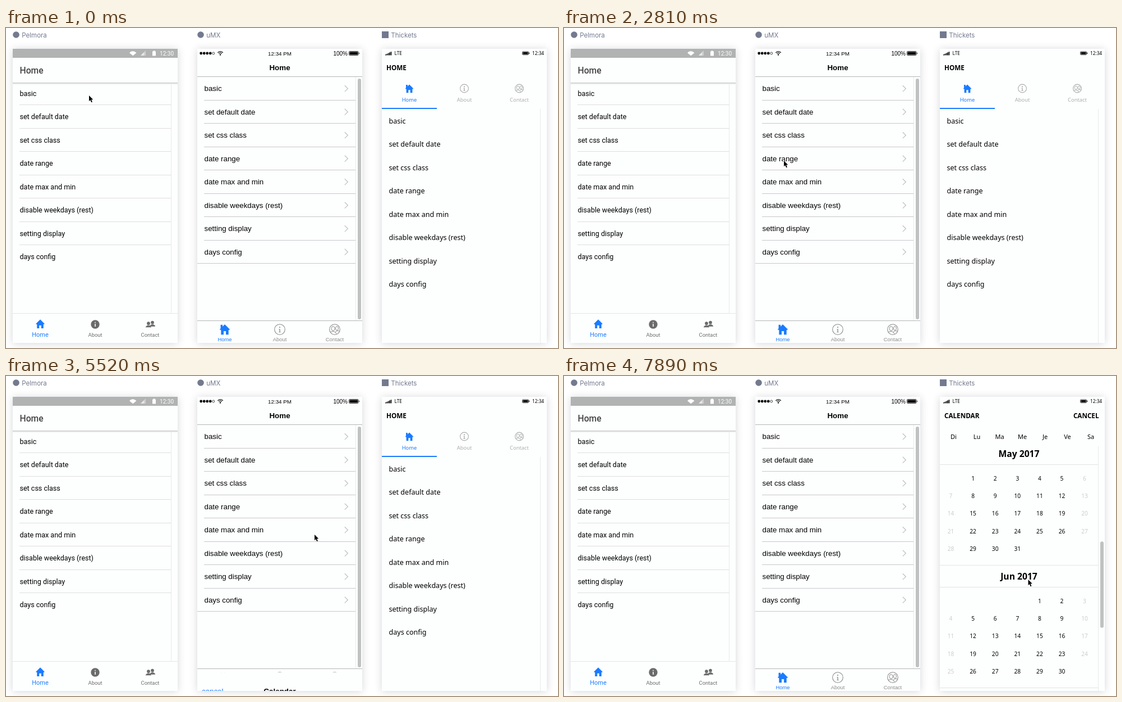
Write an HTML page with a canvas that moves like this. It is 984 by 569 pixels and loops after 8 s.

```html
<!DOCTYPE html>
<html lang="en">
<head>
<meta charset="utf-8">
<title>Calendar demo on three platforms</title>
<style>
html, body { margin: 0; width: 984px; height: 569px; overflow: hidden; background: #fff; }
canvas { display: block; width: 984px; height: 569px; }
</style>
</head>
<body>
<canvas id="stage"></canvas>
<script>
const canvas = document.getElementById('stage');
const ctx = canvas.getContext('2d');
const ratio = window.devicePixelRatio || 1;
canvas.width = 984 * ratio;
canvas.height = 569 * ratio;

const LOOP = 8000, TOP = 37, BOTTOM = 560, WIDTH = 294;
const BLUE = '#1a7bff', PAPER = '#fdfefe', LINE = '#dedede';
const ROBOTO = 'Roboto, sans-serif';
const LIB = '"Liberation Sans", Arial, sans-serif';
const NOTO = '"Noto Sans", sans-serif';

// The picture is refreshed in bursts: [first, last, count]
const BURSTS = [[720, 1630, 7], [1780, 2510, 6], [2810, 3740, 7], [3890, 4930, 8],
  [5070, 5070, 1], [5370, 6400, 8], [6540, 7450, 7], [7600, 7890, 3]];
// Pointer: [time, x, y]
const PATH = [[0, 148, 120], [800, 148, 120], [1175, 215.5, 287], [1480, 224, 292], [1780, 224, 292],
  [2510, 392, 236], [2965, 392, 236], [3740, 556, 281], [3890, 556, 281], [4336, 554.5, 313],
  [4930, 560, 289], [5070, 561, 290], [5370, 561, 290], [5517, 550, 282], [6400, 728, 368],
  [6540, 728, 368], [6995, 718, 373], [7298, 827.5, 362], [8000, 827.5, 362]];
const ITEMS = ['basic', 'set default date', 'set css class', 'date range', 'date max and min',
  'disable weekdays (rest)', 'setting display', 'days config'];
const WEEK = ['Di', 'Lu', 'Ma', 'Me', 'Je', 'Ve', 'Sa'];
const WEEK_X = [36.5, 78, 118.5, 159, 199.5, 239.5, 281];
const MONTHS = ['Mar', 'Apr', 'May', 'Jun', 'Jul'].map((name, i) => ({
  name: name + ' 2017',
  first: new Date(Date.UTC(2017, 2 + i, 1)).getUTCDay(),
  days: new Date(Date.UTC(2017, 3 + i, 0)).getUTCDate()
}));

const clamp = v => Math.max(0, Math.min(1, v));
const easeOut = p => 1 - Math.pow(1 - p, 3);
const progress = (t, from, span) => easeOut(clamp((t - from) / span));

function snap(t) {
  let last = 0;
  for (const [a, b, n] of BURSTS) {
    for (let i = 0; i < n; i++) {
      const s = n > 1 ? a + (b - a) * i / (n - 1) : a;
      if (s <= t + 10) last = s;
    }
  }
  return last;
}

function pointerAt(t) {
  const i = Math.max(1, PATH.findIndex(k => k[0] >= t));
  const [a, x, y] = PATH[i - 1], [b, x2, y2] = PATH[i];
  const p = clamp((t - a) / (b - a)), e = p * p * (3 - 2 * p);
  return [x + (x2 - x) * e, y + (y2 - y) * e];
}

// Text is placed by the middle of its capitals
function text(s, x, y, size, family, color = '#000', align = 'left', weight = 400) {
  ctx.font = `${weight} ${size}px ${family}`;
  ctx.fillStyle = color;
  ctx.textAlign = align;
  ctx.fillText(s, x, y + size * 0.36);
}
function rect(x, y, w, h, color) {
  ctx.fillStyle = color;
  ctx.fillRect(x, y, w, h);
}
function round(x, y, w, h, r, color) {
  ctx.fillStyle = color;
  ctx.beginPath();
  ctx.roundRect(x, y, w, h, r);
  ctx.fill();
}
function poly(points, color) {
  ctx.fillStyle = color;
  ctx.beginPath();
  points.forEach(([x, y]) => ctx.lineTo(x, y));
  ctx.closePath();
  ctx.fill();
}
function stroke(color, width, build) {
  ctx.strokeStyle = color;
  ctx.lineWidth = width;
  ctx.beginPath();
  build();
  ctx.stroke();
}
function disc(x, y, r, color) {
  ctx.fillStyle = color;
  ctx.beginPath();
  ctx.arc(x, y, r, 0, 7);
  ctx.fill();
}
function ring(x, y, r, color, width = 1) {
  stroke(color, width, () => ctx.arc(x, y, r, 0, 7));
}
const hline = (x, y, w, color = LINE) => rect(x, Math.floor(y), w, 1, color);
const vline = (x, y, y2) => rect(x, y, 1, y2 - y, '#e9eaea');

function house(x, y, r, chimney) {
  const at = pts => pts.map(([u, v]) => [x + u * r, y + v * r]);
  poly(at([[0, -1], [1, 0], [0.72, 0.08], [0.72, 0.95], [0.22, 0.95], [0.22, 0.3],
    [-0.22, 0.3], [-0.22, 0.95], [-0.72, 0.95], [-0.72, 0.08], [-1, 0]]), BLUE);
  if (chimney) poly(at([[-0.8, -0.92], [-0.42, -0.92], [-0.42, -0.4], [-0.8, 0]]), BLUE);
}
function info(x, y, r, color) {
  ring(x, y, r, color, 1.1);
  disc(x, y - r * 0.42, 1.1, color);
  rect(x - 0.7, y - r * 0.1, 1.4, r * 0.62, color);
  rect(x - 1.6, y - r * 0.1, 1.6, 0.8, color);
  rect(x - 1.8, y + r * 0.48, 3.6, 0.8, color);
}
function person(x, y, k, color) {
  disc(x, y - 3 * k, 3 * k, color);
  ctx.beginPath();
  ctx.ellipse(x, y + 4.4 * k, 5.4 * k, 3.8 * k, 0, Math.PI, 0);
  ctx.fill();
}
function pair(x, y, r, color) {
  ring(x, y, r, color, 1.1);
  ctx.save();
  ctx.beginPath();
  ctx.arc(x, y, r, 0, 7);
  ctx.clip();
  const k = r / 9.5;
  stroke(color, 1, () => ctx.ellipse(x - 3 * k, y - 1.6 * k, 3 * k, 4 * k, 0, 0, 7));
  stroke(color, 1, () => ctx.ellipse(x + 4 * k, y - 2 * k, 2.6 * k, 3.6 * k, 0, 0, 7));
  stroke(color, 1, () => ctx.ellipse(x - 3.4 * k, y + 8.6 * k, 6.4 * k, 5 * k, 0, Math.PI, 0));
  stroke(color, 1, () => ctx.ellipse(x + 6 * k, y + 7 * k, 5 * k, 4.6 * k, 0, Math.PI * 1.1, 0));
  ctx.restore();
}
function fan(x, y, r, color) {
  ctx.fillStyle = color;
  ctx.beginPath();
  ctx.moveTo(x, y);
  ctx.arc(x, y, r, -Math.PI * 0.78, -Math.PI * 0.22);
  ctx.fill();
}
function battery(x, y, w, h) {
  stroke('#000', 0.8, () => ctx.roundRect(x, y, w, h, 1.3));
  rect(x + 1, y + 1, w - 2, h - 2, '#000');
  rect(x + w + 0.8, y + h / 2 - 1.2, 1, 2.4, '#000');
}

function frame(x, label, square) {
  const tone = '#737a90';
  if (square) rect(x, 6, 12, 12, tone);
  else disc(x + 6, 12, 5.8, tone);
  text(label, x + 16.3, 13, 11.5, 'Inter, sans-serif', tone);
  ctx.save();
  ctx.shadowColor = 'rgba(50,55,75,.2)';
  ctx.shadowBlur = 13 * ratio;
  ctx.shadowOffsetY = 1 * ratio;
  rect(x, TOP, WIDTH, BOTTOM - TOP, PAPER);
  ctx.restore();
}

function materialPage() {
  ctx.save();
  ctx.beginPath();
  ctx.rect(12, 90, WIDTH, 20);
  ctx.clip();
  ctx.shadowColor = 'rgba(0,0,0,.32)';
  ctx.shadowBlur = 3 * ratio;
  ctx.shadowOffsetY = 1 * ratio;
  rect(5, 53, 308, 44, PAPER);
  ctx.restore();
  text('Home', 24.5, 75, 15.66, ROBOTO, '#424242', 'left', 500);
  ITEMS.forEach((s, i) => {
    const y = 116 + i * 41.5;
    text(s, 24.5, y, 12.54, ROBOTO);
    if (i < 7) hline(24, y + 20.5, 271);
  });
  vline(294, 98, 507);
  hline(12, 507, WIDTH, '#e4e5e5');
  house(61, 526.3, 8, false);
  const gray = '#6b6b6b';
  disc(159, 527, 7.7, gray);
  rect(158.2, 526, 1.6, 5, '#fff');
  rect(158.2, 522.8, 1.6, 1.6, '#fff');
  person(261, 526.5, 0.95, gray);
  disc(254, 525.5, 4.3, PAPER);
  person(254.3, 528.5, 1.05, PAPER);
  person(254, 528, 0.95, gray);
  text('Home', 61, 545, 10.97, ROBOTO, BLUE, 'center');
  text('About', 159, 545.5, 9.4, ROBOTO, gray, 'center');
  text('Contact', 257, 545.5, 9.4, ROBOTO, gray, 'center');
}
function materialStatus() {
  rect(12, TOP, WIDTH, 16, '#b1b2b2');
  fan(226.2, 49.3, 8, '#fff');
  poly([[240, 49], [249, 49], [249, 40]], '#cfcfcf');
  poly([[240, 49], [246, 49], [246, 43]], '#e8e8e8');
  rect(261, 41.5, 6, 8, '#fff');
  rect(262.7, 40.3, 2.6, 2, '#fff');
  text('12:30', 299, 45, 10, ROBOTO, '#fff', 'right');
}

function roundedPage() {
  text('Home', 488, 70, 13.4, LIB, '#000', 'center', 700);
  hline(341, 86, WIDTH, '#b5b6b6');
  ITEMS.forEach((s, i) => {
    const y = 107.7 + i * 41.5;
    text(s, 353.5, y, 13.3, LIB);
    const x = i < 7 ? 353 : 341;
    hline(x, y + 20.4, 624 - x, '#c8c8ca');
    stroke('#c2c2c6', 1.3, () => {
      ctx.moveTo(603.8, y - 5.4);
      ctx.lineTo(609.3, y);
      ctx.lineTo(603.8, y + 5.4);
    });
  });
  vline(623, 87, 520);
  round(627, 90, 6, 428, 3, '#c0c1c1');
  hline(341, 520, WIDTH, '#b5b6b6');
  const gray = '#8c8c8c';
  house(390, 536.3, 9.3, true);
  info(488, 536, 9.3, gray);
  pair(586, 536, 9.3, gray);
  text('Home', 390, 554, 9.4, LIB, BLUE, 'center');
  text('About', 488, 554, 9.4, LIB, gray, 'center');
  text('Contact', 586, 554, 9.4, LIB, gray, 'center');
}
function roundedStatus() {
  for (let i = 0; i < 5; i++) {
    if (i < 4) disc(347.7 + i * 5.5, 45, 2.4, '#000');
    else ring(347.7 + i * 5.5, 45, 2, '#000', 0.7);
  }
  disc(382, 47.5, 1.2, '#000');
  [3.6, 6.2].forEach(r => stroke('#000', 1.3, () => ctx.arc(382, 48, r, -Math.PI * 0.77, -Math.PI * 0.23)));
  text('12:34 PM', 488, 45, 9.8, LIB, '#000', 'center');
  text('100%', 609, 45, 10, LIB, '#000', 'right');
  battery(611.5, 41.5, 16.5, 7);
}

function flatPage() {
  text('HOME', 678, 71, 11.7, NOTO, '#000', 'left', 700);
  const gray = '#adadad';
  house(719, 108, 7.5, true);
  info(817, 107.5, 7.4, gray);
  pair(915, 107.5, 7.4, gray);
  text('Home', 719, 128, 9.4, NOTO, BLUE, 'center');
  text('About', 817, 128, 9.4, NOTO, gray, 'center');
  text('Contact', 915, 128, 9.4, NOTO, gray, 'center');
  rect(670, 142, 98, 2, BLUE);
  vline(952, 144, BOTTOM);
  ITEMS.forEach((s, i) => text(s, 682.5, 165.3 + i * 41.5, 12.54, NOTO));
}
function flatStatus() {
  for (let i = 0; i < 5; i++) rect(676 + i * 2.4, 47 - i * 1.2, 1.7, 1.5 + i * 1.2, '#000');
  text('LTE', 692.5, 45, 8.2, NOTO);
  battery(920.5, 42, 11, 5.6);
  text('12:34', 959, 45, 8.2, NOTO, '#000', 'right');
}

function calendar(o, scroll, picked) {
  const { dx, font, top, weekY, titleY, bold } = o;
  rect(12 + dx, TOP, WIDTH, BOTTOM - TOP, PAPER);
  o.bar();
  WEEK.forEach((s, i) => text(s, WEEK_X[i] + dx, weekY, 10.97, font, '#000', 'center'));
  ctx.save();
  ctx.beginPath();
  ctx.rect(12 + dx, top, WIDTH, BOTTOM - top);
  ctx.clip();
  let y = titleY - scroll;
  MONTHS.forEach((m, i) => {
    const rows = Math.ceil((m.first + m.days) / 7);
    text(m.name, 153 + dx, y, 15.66, font, '#000', 'center', bold);
    hline(12 + dx, y + 19.6, 283, '#e2e3e3');
    if (i) hline(12 + dx, y - 20, 283, '#e2e3e3');
    for (let d = 1; d <= m.days; d++) {
      const cell = m.first + d - 1, col = cell % 7;
      const x = dx + (col === 6 ? 270 : 31.5 + col * 39.6);
      const cy = y + 44 + Math.floor(cell / 7) * 31.4;
      const on = picked && !i && d === 24;
      const off = !i && d < 24 || o.workdays && col % 6 === 0;
      if (on) round(x - 19.6, cy - 15.2, 39, 31.4, 4.5, '#ff9500');
      text(String(d), x, cy, 10.2, font, on ? '#fff' : off ? '#cccdcd' : '#000', 'center');
    }
    y += 61 + rows * 31.4;
  });
  const view = BOTTOM - top, track = view - 4;
  const total = scroll > 190 ? 1223 : 756;
  vline(282 + 12 + dx + (o.workdays ? 0 : 0), top, BOTTOM);
  round(298 + dx, top + 2.5 + scroll * track / total, 6, track * view / total, 3, '#c0c1c1');
  ctx.restore();
}

const MATERIAL = { dx: 0, font: ROBOTO, bold: 500, top: 140, weekY: 118.7, titleY: 159.5, bar() {
  text('basic demo', 24.5, 75, 15.66, ROBOTO, '#424242', 'left', 500);
  text('CANCEL', 295.3, 75, 10.97, ROBOTO, '#424242', 'right', 500);
} };
const ROUNDED = { dx: 329, font: LIB, bold: 700, top: 122, weekY: 104.7, titleY: 141.3, bar() {
  text('cancel', 349, 70, 13.3, LIB, BLUE);
  text('Calendar', 488, 70, 13.4, LIB, '#000', 'center', 700);
} };
const FLAT = { dx: 658, font: NOTO, bold: 700, top: 125, weekY: 108, titleY: 144, workdays: true, bar() {
  text('CALENDAR', 678, 71, 11.7, NOTO, '#000', 'left', 700);
  text('CANCEL', 953.5, 71, 11.7, NOTO, '#000', 'right', 700);
} };

function modal(o, shift, alpha, scroll = 0, picked = false) {
  if (alpha <= 0 || shift >= BOTTOM - TOP) return;
  ctx.save();
  ctx.beginPath();
  ctx.rect(12 + o.dx, TOP, WIDTH, BOTTOM - TOP);
  ctx.clip();
  ctx.globalAlpha = alpha;
  ctx.translate(0, shift);
  calendar(o, scroll, picked);
  ctx.restore();
}

function outlined(points, fill, edge) {
  stroke(edge, 1.6, () => {
    points.forEach(([x, y]) => ctx.lineTo(x, y));
    ctx.closePath();
  });
  poly(points, fill);
}
function pointer(x, y, hand) {
  ctx.save();
  ctx.translate(x, y);
  ctx.lineJoin = 'round';
  if (hand) {
    outlined([[-1.2, 0.8], [0.4, 0.3], [2, 4.2], [3.6, 3.6], [5, 4.4], [6.4, 4], [7.4, 5.2], [8.4, 6],
      [8.3, 9.8], [7, 13], [1.8, 13], [-0.4, 10.3], [-3.2, 7.6], [-2.4, 6.4], [0, 7.6]], '#fff', '#111');
    [3, 4.9, 6.6].forEach(u => rect(u - 0.4, 8, 0.8, 3.2, '#222'));
  } else {
    outlined([[0, 0], [0, 10.2], [2.3, 8.1], [4.1, 12.2], [5.9, 11.4], [4.1, 7.5], [7.2, 7.3]], '#000', '#fff');
  }
  ctx.restore();
}

function draw(t) {
  ctx.setTransform(ratio, 0, 0, ratio, 0, 0);
  rect(0, 0, 984, 569, '#fff');
  frame(12, 'Pelmora');
  frame(341, 'uMX');
  frame(670, 'Thickets', true);

  materialPage();
  const a = progress(t, 780, 280) - progress(t, 1770, 200);
  modal(MATERIAL, 40 * (1 - a), a);
  materialStatus();

  roundedPage();
  const b = progress(t, 2980, 400) - progress(t, 5350, 277.5);
  modal(ROUNDED, (BOTTOM - TOP) * (1 - b), 1, 171 * progress(t, 4400, 500), t >= 3890);
  roundedStatus();

  flatPage();
  const c = progress(t, 6560, 280);
  modal(FLAT, 40 * (1 - c), c, 473.4 * progress(t, 7380, 510));
  flatStatus();

  const hand = t > 1000 && t < 1900 || t > 3600 && t < 5400;
  pointer(...pointerAt(t), hand);
}

const start = performance.now();
function tick() {
  draw(snap((performance.now() - start) % LOOP));
  requestAnimationFrame(tick);
}
tick();
</script>
</body>
</html>
```
